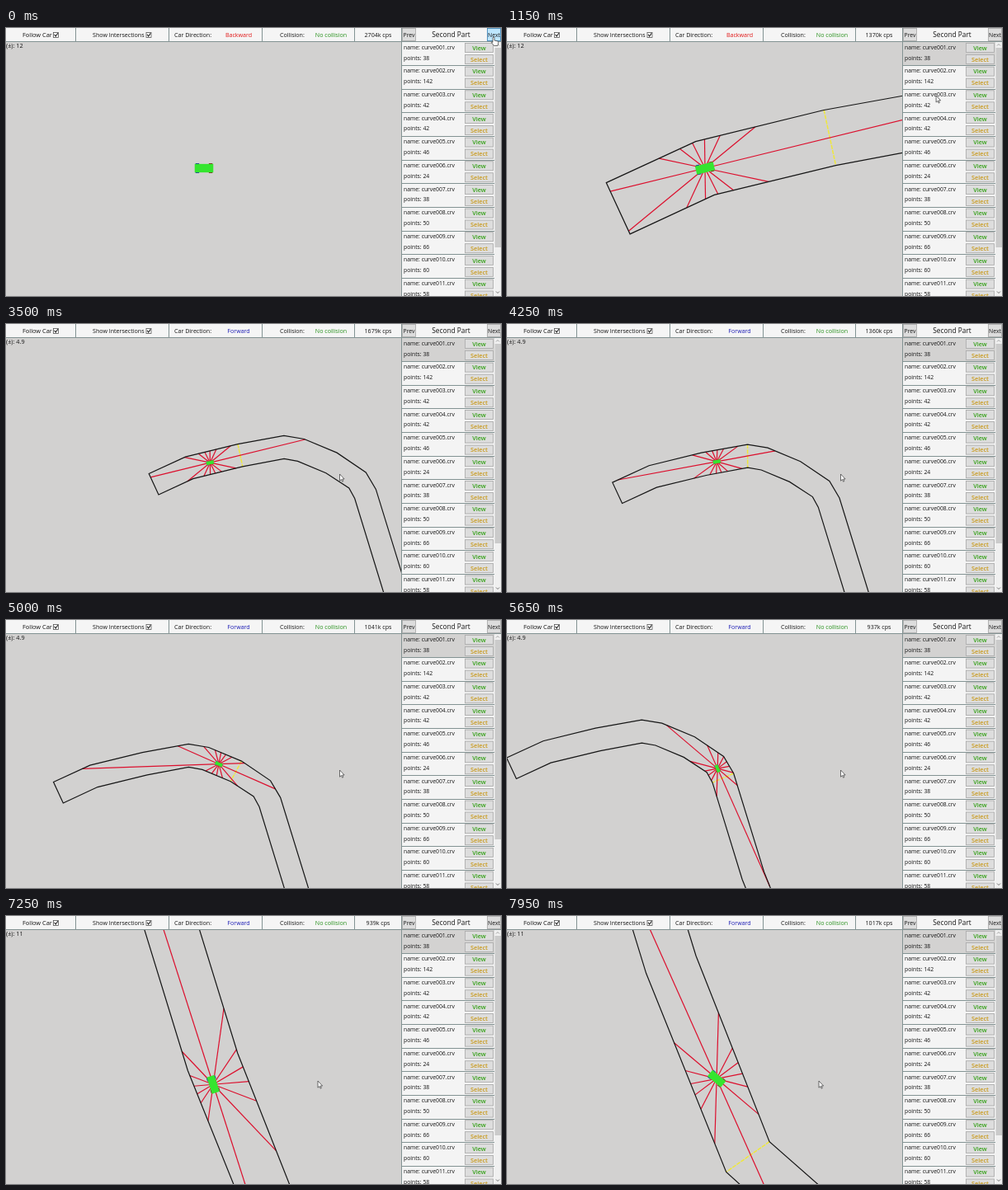
Write an HTML page with a canvas that moves like this. It is 600 px wide and 325 px high and loops after 8000 ms.

```html
<!DOCTYPE html>
<html lang="en">
<head>
<meta charset="utf-8">
<title>Car track</title>
<style>
  html, body { margin: 0; width: 100%; height: 100%; overflow: hidden; background: #d2d1d0; }
  canvas { display: block; }
</style>
</head>
<body>
<canvas id="stage" width="600" height="325"></canvas>
<script>
const ctx = document.getElementById('stage').getContext('2d');
const LOOP = 8000, STEP = 50, TAU = Math.PI * 2, DEG = TAU / 360;
const FONT = '"Open Sans", "Noto Sans", sans-serif';
const CENTER = [240, 170], RAYS = 14, HALF_WIDTH = 14;
const SELECT_AT = 0.8, FORWARD_AT = 1.7;
const INK = '#141414', RULE = '#839393', PANEL = '#f5f5f5', BUTTON = '#dddddd';
const points = [38, 142, 42, 42, 46, 24, 38, 50, 66, 60, 58];

const clamp = (v, a, b) => Math.min(b, Math.max(a, v));
const progress = (t, a, b) => clamp((t - a) / (b - a), 0, 1);
const ease = (t, a, b) => { const u = progress(t, a, b); return u * u * (3 - 2 * u); };
const mix = (a, b, u) => a.map((v, i) => v + (b[i] - v) * u);
const angleOf = (a, b) => Math.atan2(b[1] - a[1], b[0] - a[0]);
// Shift a point to the right of the given direction
const shift = ([x, y], angle, d) => [x - Math.sin(angle) * d, y + Math.cos(angle) * d];

// Middle line of the track, in pixels at a zoom of 4.9
const middle = [[180.6, 194.8], [223.6, 174.9], [285.4, 159.8], [338.5, 150], [359, 153.5], [396, 169],
  [427.5, 190], [437, 206.5], [473.5, 325], [514.2, 427], [550, 459]];
const legs = middle.slice(1).map((p, i) => ({
  from: middle[i], to: p, angle: angleOf(middle[i], p),
  length: Math.hypot(p[0] - middle[i][0], p[1] - middle[i][1])
}));
const last = legs.length - 1;
const side = d => middle.map((p, i) =>
  shift(p, (legs[Math.max(0, i - 1)].angle + legs[Math.min(last, i)].angle) / 2, d));
const outer = side(-HALF_WIDTH), inner = side(HALF_WIDTH);
const wall = [...outer].reverse().concat(inner);

function locate(distance) {
  let leg = 1;
  while (leg < last && distance > legs[leg].length) distance -= legs[leg++].length;
  const { from, to, length, angle } = legs[leg];
  return { leg, angle, pos: mix(from, to, distance / length) };
}

// Steady acceleration, then a gentle loss of speed
function travelled(t) {
  const u = t - 4.5;
  return u < 0 ? 26 * Math.max(0, t - 2.5) ** 2 : 104 + 104 * u - 0.93 * u ** 3;
}

function carAt(t) {
  const distance = travelled(t);
  const { leg, angle, pos } = locate(distance);
  const drift = 4.2 * (ease(t, 5.6, 6.2) - ease(t, 7.3, 7.9));
  const steer = 4 * ease(t, 6.6, 7.1) - 32 * ease(t, 7.4, 7.95);
  return {
    pos: shift(pos, angle, drift),
    heading: angleOf(pos, locate(distance + 25).pos) + steer * DEG,
    gate: leg + 1
  };
}

// The camera trails the car by its recent velocity
function cameraAt(t) {
  const { pos } = carAt(t), newer = carAt(t - 0.1).pos, older = carAt(t - 0.28).pos;
  return pos.map((v, i) => v - newer[i] + older[i]);
}

// Wheel zoom goes in even notches
function zoomAt(t) {
  const notches = (start, end, count) => Math.ceil(progress(t, start, end) * count) / count;
  return 12 * Math.pow(4.9 / 12, notches(2, 2.8, 9)) * Math.pow(11.2 / 4.9, notches(6.4, 7, 8));
}

function checksPerSecond(t) {
  if (t < SELECT_AT) return 2704;
  const keys = [[1.85, 1370], [3.5, 1679], [5, 1041], [6.3, 834], [7.95, 1017]];
  return keys.reduce((value, [at, next], i) =>
    i ? value + (next - keys[i - 1][1]) * progress(t, keys[i - 1][0], at) : next, 0);
}

function pointerAt(t) {
  let pos = [590, 11];
  for (const [x, y, arrival] of [[572, 36, 0.55], [408, 181, 1.4], [404.5, 182, 2.2], [378, 200, 6.9]])
    pos = mix(pos, [x, y], ease(t, arrival - 0.4, arrival));
  return pos;
}

function castRay([x, y], angle) {
  const dx = Math.cos(angle), dy = Math.sin(angle);
  let reach = 900;
  for (let i = 1; i < wall.length; i++) {
    const [ax, ay] = wall[i - 1], ex = wall[i][0] - ax, ey = wall[i][1] - ay;
    const det = dx * ey - dy * ex;
    const d = ((ax - x) * ey - (ay - y) * ex) / det;
    const u = ((ax - x) * dy - (ay - y) * dx) / det;
    if (d > 0 && u >= 0 && u <= 1) reach = Math.min(reach, d);
  }
  return [x + dx * reach, y + dy * reach];
}

function rect(x, y, w, h, fill, border) {
  ctx.fillStyle = fill;
  ctx.fillRect(x, y, w, h);
  if (border) {
    ctx.strokeStyle = border;
    ctx.lineWidth = 0.8;
    ctx.strokeRect(x + 0.5, y + 0.5, w - 1, h - 1);
  }
}

function text(str, x, y, size = 7.1, color = INK, align = 'left', weight = 400) {
  ctx.font = `${weight} ${size}px ${FONT}`;
  ctx.textAlign = align;
  ctx.fillStyle = color;
  ctx.fillText(str, x, y);
}

function line(pts, color, width) {
  ctx.beginPath();
  pts.forEach(p => ctx.lineTo(p[0], p[1]));
  ctx.strokeStyle = color;
  ctx.lineWidth = width;
  ctx.stroke();
}

function button(label, x, y, w, h, size, color = INK, weight = 400, fill = BUTTON, border = '#a9a9a9') {
  rect(x, y, w, h, fill, border);
  text(label, x + w / 2, y + h / 2 + 2.7, size, color, 'center', weight);
}

function drawCar([x, y], heading, scale) {
  ctx.save();
  ctx.translate(x, y);
  ctx.rotate(heading);
  ctx.scale(scale, scale);
  for (const edge of [-1, 1]) {
    rect(-4.2, edge * 2 - 0.45, 1.8, 0.9, '#1f3f9c');
    rect(2.4, edge * 2 - 0.45, 1.8, 0.9, '#7a3420');
  }
  rect(-4.6, -2.1, 9.2, 4.2, '#35e52f');
  ctx.restore();
}

function drawWorld(t) {
  rect(0, 0, 600, 325, '#d2d1d0');
  const zoom = zoomAt(t), scale = zoom / 4.9;
  const { pos, heading, gate } = carAt(t);
  const camera = cameraAt(t);
  const toScreen = p => p.map((v, i) => CENTER[i] + (v - camera[i]) * scale);
  const car = toScreen(pos), selected = t >= SELECT_AT;

  if (selected) {
    ctx.setLineDash([5, 1.2]);
    line([outer[gate], inner[gate]].map(toScreen), '#efe83c', 1.5);
    ctx.setLineDash([]);
    for (let i = 0; i < RAYS; i++)
      line([car, toScreen(castRay(pos, heading + i * TAU / RAYS))], '#dc0f2d', 1.2);
    line(wall.map(toScreen), '#151515', 1.2);
  }
  drawCar(car, selected ? heading : 0, scale);
  text(`(±): ${zoom.toPrecision(2)}`, 0, 24, 7.3);
}

function checkbox(x) {
  rect(x, 5, 7, 7, '#fff', '#555');
  line([[x + 1.6, 7.8], [x + 3.2, 10], [x + 5.8, 6.2]], '#222', 1.1);
}

function drawHeader(t) {
  rect(0, 0, 600, 16, PANEL);
  for (const x of [84, 197, 310, 422]) rect(x, 0, 1, 16, RULE);
  text('Follow Car', 20, 11, 7.4);
  checkbox(57);
  text('Show Intersections', 105, 11);
  checkbox(169.5);
  text('Car Direction:', 204, 11);
  const forward = t >= FORWARD_AT;
  text(forward ? 'Forward' : 'Backward', 282, 11, 7.1, forward ? '#1c1cb4' : '#e01818', 'center');
  text('Collision:', 332, 11);
  text('No collision', 394, 11, 7.1, '#27901c', 'center');
  text(`${Math.round(checksPerSecond(t))}k cps`, 451, 11, 7.1, INK, 'center');
}

function drawList(t) {
  rect(480, 0, 120, 325, '#f4f4f4');
  points.forEach((count, i) => {
    const y = 17 + i * 28.65;
    if (i === 0 && t >= SELECT_AT) rect(480, y, 112, 28, '#d3d2d1');
    text(`name: curve${String(i + 1).padStart(3, '0')}.crv`, 482, y + 8.6, 6.8);
    text(`points: ${count}`, 482, y + 21.5, 6.8);
    button('View', 556, y + 1, 35, 12, 7.3, '#35a018', 600);
    button('Select', 556, y + 15, 35, 12, 7.3, '#c99a1c', 600);
    rect(480, Math.round(y + 28), 112, 1, RULE);
  });
  rect(592, 17, 8, 308, '#f0f0f0');
  rect(592.5, 24, 7.5, 242, '#cbcbcb');
  line([[594, 21.5], [596, 19.5], [598, 21.5]], '#999', 0.9);
  line([[594, 319.5], [596, 321.5], [598, 319.5]], '#666', 0.9);

  rect(480, 0, 120, 16, PANEL);
  button('Prev', 480, 0, 17, 16, 6.8);
  text('Second Part', 539.5, 11, 8.3, INK, 'center');
  const hover = t < 0.25;
  button('Next', 583, 0, 17, 16, 6.8, INK, 400, hover ? '#bee6fd' : BUTTON, hover ? '#3c7fb1' : '#a9a9a9');
  rect(479, 0, 1, 325, RULE);
  rect(0, 16, 600, 1, RULE);
}

const arrow = new Path2D('M0 0V8.2L1.9 6.5 3.1 9.2 4.3 8.6 3.1 6H5.6Z');
const hand = new Path2D('M1 0Q2 0 2 1V4L6 5Q7 5.3 6.8 7L6 10.5H1.5L-1.6 6.6Q-1.5 5.5 0 6.4V1Q0 0 1 0Z');

function drawPointer(t) {
  const [x, y] = pointerAt(t), shape = x > 555 ? hand : arrow;
  ctx.save();
  ctx.translate(x, y);
  ctx.fillStyle = '#fff';
  ctx.strokeStyle = '#333';
  ctx.lineWidth = 0.7;
  ctx.fill(shape);
  ctx.stroke(shape);
  ctx.restore();
}

const start = performance.now();
function frame() {
  const elapsed = Math.max(0, performance.now() - start) % LOOP;
  const t = Math.floor(elapsed / STEP) * STEP / 1000;
  drawWorld(t);
  drawHeader(t);
  drawList(t);
  drawPointer(t);
  requestAnimationFrame(frame);
}
frame();
</script>
</body>
</html>
```
